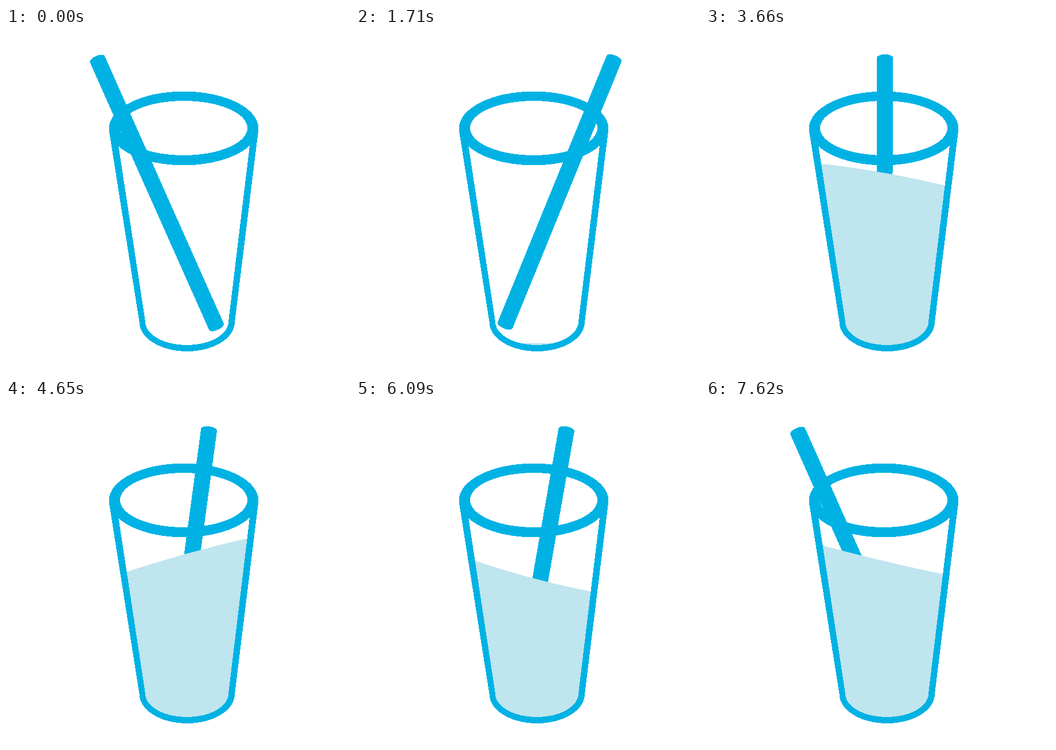
Recreate the animation shown at these times as an HTML page. Size 600x600 px, loop 7.65 s.

```html
<!DOCTYPE html>
<html lang="en">
<head>
<meta charset="utf-8">
<title>Glass with straw</title>
<style>
  html, body { margin: 0; width: 100%; height: 100%; overflow: hidden; background: #fff; }
  svg { display: block; width: 100vw; height: 100vh; }
  .ink { fill: #00b2e4; shape-rendering: crispEdges; }
  #liquid { fill: #bfe5ee; }
</style>
</head>
<body>
<svg viewBox="0 0 600 600">
  <clipPath id="inside">
    <path d="M186 178L238 513A78 46 0 0 0 394 513L434 178Z"/>
  </clipPath>
  <path id="straw" class="ink"/>
  <g clip-path="url(#inside)"><path id="liquid"/></g>
  <g class="ink" fill-rule="evenodd">
    <path d="M179.6 178L232.6 513A83.2 51 0 0 0 399 513L440.2 178Z
             M192 178L243 512A72.5 41 0 0 0 388 512L428.3 178Z"/>
    <path d="M179.6 175A130.3 64.4 0 0 1 440.2 175A130.3 64.4 0 0 1 179.6 175Z
             M199 174.5A111 47.5 0 0 1 421 174.5A111 47.5 0 0 1 199 174.5Z"/>
  </g>
</svg>
<script>
const LOOP = 7650, STEP = 30, POUR = 1700;
const straw = document.getElementById('straw');
const liquid = document.getElementById('liquid');

// Moments when the straw rests on a side, starting on the left.
const turns = [0, 1595, 3108, 4188, 5365, 6500, LOOP];

const smooth = p => p * p * (3 - 2 * p);

// Cosine that peaks at the given time and reaches its low half a period later.
const wave = (t, peak, half) => Math.cos(Math.PI * (t - peak) / half);

// 0 when the straw leans left, 1 when it leans right; the first swing starts slowly.
function swing(t) {
  const i = turns.findLastIndex(start => t >= start);
  const p = (t - turns[i]) / (turns[i + 1] - turns[i]);
  const e = smooth(i ? p : p ** 1.5);
  return i % 2 ? 1 - e : e;
}

function drawStraw(u) {
  const lift = Math.sin(Math.PI * u), half = 14;
  const x1 = 159.3 + 295.7 * u, y1 = 54.5 - u - 2 * lift;
  const x2 = 313.5 + 53.5 * Math.cos(Math.PI * u), y2 = 521 - 4 * u + 27 * lift;
  const len = Math.hypot(x2 - x1, y2 - y1);
  const nx = (y2 - y1) / len * half, ny = (x1 - x2) / len * half;
  const tilt = Math.atan2(ny, nx) * 180 / Math.PI;
  const cap = `A${half} 6 ${tilt} 0 1 `;
  straw.setAttribute('d', `M${x1 - nx} ${y1 - ny}${cap}${x1 + nx} ${y1 + ny}`
    + `L${x2 + nx} ${y2 + ny}${cap}${x2 - nx} ${y2 - ny}Z`);
}

// The level rises quickly, then drifts slowly while the surface rocks and bends.
function drawLiquid(t) {
  if (t < POUR) return liquid.setAttribute('d', '');
  const empty = Math.exp((POUR - t) / 400), full = 1 - empty;
  const level = 556 * empty + (280.5 - 27 * wave(t, 3660, 2600)) * full;
  const tilt = (34 * wave(t, 2860, 1010) + 10 - 0.003 * (t - 2760)) * full;
  const sag = (10 * wave(t, 2760, 1380) + 1) * full;
  const left = level + tilt, right = level - tilt;
  const lx = 193 + 0.153 * (left - 205), rx = 428 - 0.12 * (right - 205);
  liquid.setAttribute('d', `M180 ${left}L${lx} ${left}`
    + `Q${(lx + rx) / 2} ${level + 2 * sag} ${rx} ${right}`
    + `L440 ${right}V600H180Z`);
}

function frame() {
  const t = Math.floor(performance.now() % LOOP / STEP) * STEP;
  drawStraw(swing(t));
  drawLiquid(t);
  requestAnimationFrame(frame);
}
frame();
</script>
</body>
</html>
```
